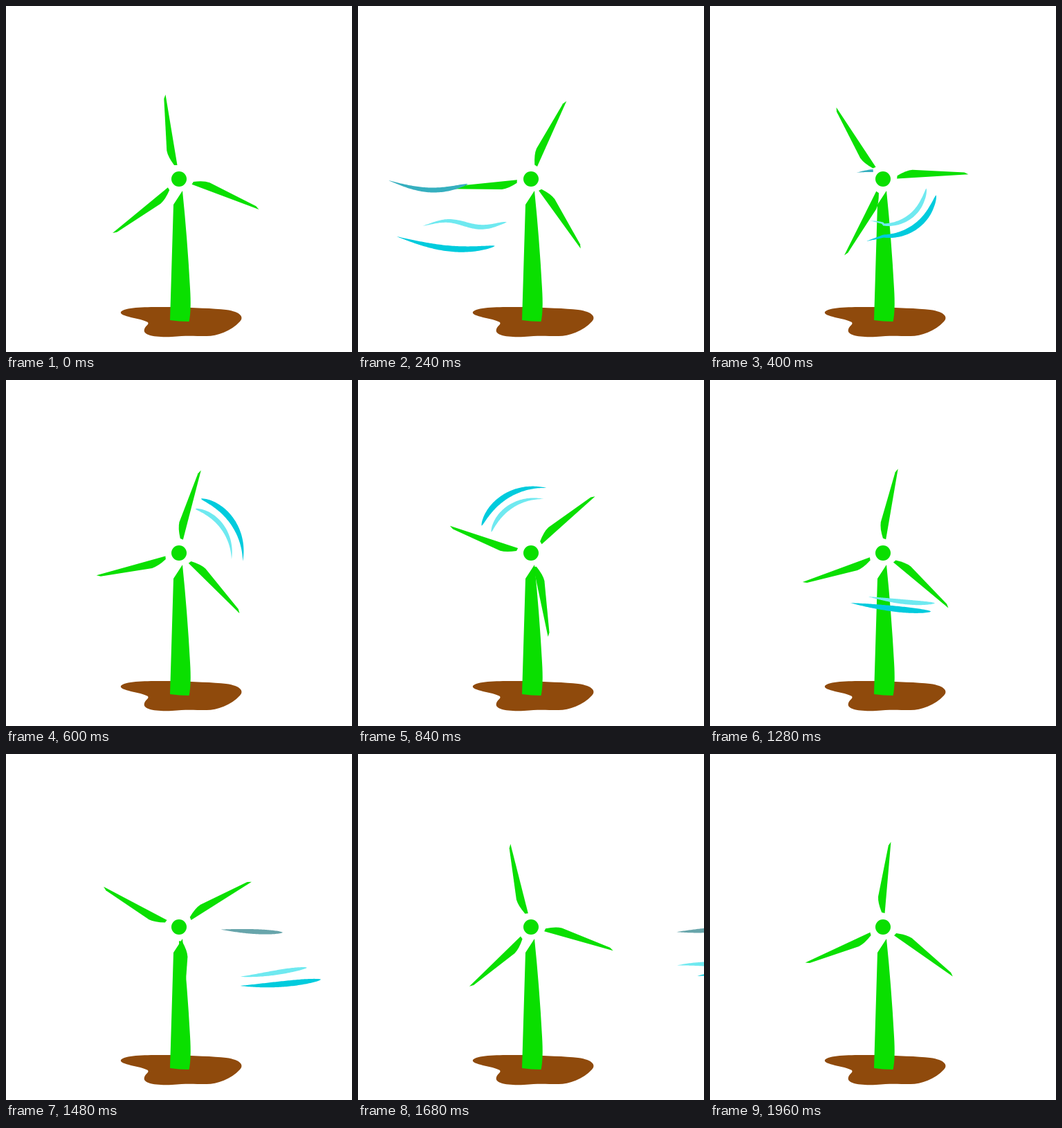
Write an HTML page with a canvas that moves like this. It is 500x500 px and loops after 2 s.

```html
<!DOCTYPE html>
<html lang="en">
<head>
<meta charset="utf-8">
<title>Wind turbine</title>
<style>
html, body { margin: 0; width: 100%; height: 100%; overflow: hidden; background: #fff; }
canvas { display: block; width: 500px; height: 500px; }
</style>
</head>
<body>
<canvas id="stage" width="500" height="500"></canvas>
<script>
const ctx = document.getElementById('stage').getContext('2d');
const GREEN = '#0adf00', BROWN = '#8f4a0c';
const STEP = 40, STEPS = 50;
const SPIN = Math.PI * 2 / 25; // radians per step, for rotor and wind alike
const EYE = { x: 251, y: 246 }; // centre of the swirl

const ground = new Path2D('M166 442C172 434 215 435 240 435C270 436 300 437 318 439C340 442 344 450 338 456C325 470 305 477 290 477C270 477 260 476 240 478C215 479 197 476 200 467C202 461 207 461 205 457C195 451 163 449 166 442Z');
const tower = new Path2D('M255 267L242 287L237 454Q250 456 264.5 456Q268 441 266 408Q262 335 255 267Z');
const blade = new Path2D('M230.5 128L228.3 134L232.3 209Q234 218 243 230L247.5 230Z');

const wave = (x0, y0, height, length) =>
  x => y0 + height * Math.sin(2 * Math.PI * (x - x0) / length);

// Each wisp blows in along one wave, swirls up to the angle `leave`,
// then blows out from x = `out` along another wave.
const wisps = [
  {
    colors: ['#36afbf', '#68a5ab'], width: 7, radius: 85, reach: 1.05, hidden: true,
    inX: 236, enter: wave(44, 252, 14, 260),
    leave: 6.85, out: 266, exit: wave(266, 250, 8, 600)
  },
  {
    colors: ['#6fe9f0', '#6fe9f0'], width: 6.8, radius: 70, reach: 1.38,
    inX: EYE.x, enter: wave(154, 315, 4.5, 100),
    leave: 5.8, out: 228, exit: wave(228, 313, 9.5, 360)
  },
  {
    colors: ['#00cbdd', '#00cbdd'], width: 8.5, radius: 86.5, reach: 1.35,
    inX: EYE.x, enter: wave(54, 332.5, 19, 394),
    leave: 5.8, out: 202, exit: wave(202, 322, 13, 560)
  }
];

// Fast in, steady around the hub, fast out.
function turnAt(n) {
  const early = Math.max(0, 15 - n), late = Math.max(0, n - 26);
  return 1.4 + SPIN * (n - 15) - 0.0172 * early ** 2 + 0.0037 * late ** 2;
}

// Point at a turn of the track; u runs from tail to head and pulls the head inward.
function place(w, turn, u) {
  if (turn <= 0) {
    const x = w.inX + turn * w.radius;
    return [x, w.enter(x)];
  }
  if (turn >= w.leave) {
    const x = w.out + (turn - w.leave) * w.radius;
    return [x, w.exit(x)];
  }
  if (w.hidden) return null;
  const r = w.radius + 12 * (0.5 - u) * Math.min(1, turn);
  return [EYE.x + r * Math.sin(turn), EYE.y + r * Math.cos(turn)];
}

// Thin tail, fullest towards the head.
const taper = u => u * Math.pow(1 - u, 0.65) / 0.331;

function drawWisp(w, n) {
  const tail = turnAt(n);
  const span = w.reach + 2.8 * Math.max(0, 15 - n) / w.radius;
  const spine = [], parts = 60;
  for (let i = 0; i <= parts; i++) {
    const u = i / parts, p = place(w, tail + span * u, u);
    if (p) spine.push({ x: p[0], y: p[1], half: taper(u) * w.width / 2 });
  }
  if (spine.length < 2) return;

  const upper = [], lower = [];
  spine.forEach((p, i) => {
    const a = spine[Math.max(0, i - 1)], b = spine[Math.min(spine.length - 1, i + 1)];
    const d = Math.hypot(b.x - a.x, b.y - a.y) || 1;
    const nx = (b.y - a.y) / d * p.half, ny = (a.x - b.x) / d * p.half;
    upper.push([p.x + nx, p.y + ny]);
    lower.unshift([p.x - nx, p.y - ny]);
  });
  ctx.beginPath();
  upper.concat(lower).forEach(p => ctx.lineTo(p[0], p[1]));
  ctx.fillStyle = w.colors[tail > Math.PI ? 1 : 0];
  ctx.fill();
}

function drawRotor(n) {
  for (let i = 0; i < 3; i++) {
    ctx.save();
    ctx.translate(250, 250);
    ctx.rotate(i * Math.PI * 2 / 3 - n * SPIN);
    ctx.translate(-250, -250);
    ctx.fill(blade);
    ctx.restore();
  }
  ctx.beginPath();
  ctx.arc(250, 250, 11, 0, Math.PI * 2);
  ctx.fill();
}

function draw(ms) {
  const n = Math.floor(ms / STEP) % STEPS;
  ctx.fillStyle = '#fff';
  ctx.fillRect(0, 0, 500, 500);
  ctx.fillStyle = BROWN;
  ctx.fill(ground);
  ctx.fillStyle = GREEN;
  ctx.fill(tower);
  drawRotor(n);
  wisps.forEach(w => drawWisp(w, n));
}

const start = performance.now();
function loop() {
  draw(performance.now() - start);
  requestAnimationFrame(loop);
}
loop();
</script>
</body>
</html>
```
